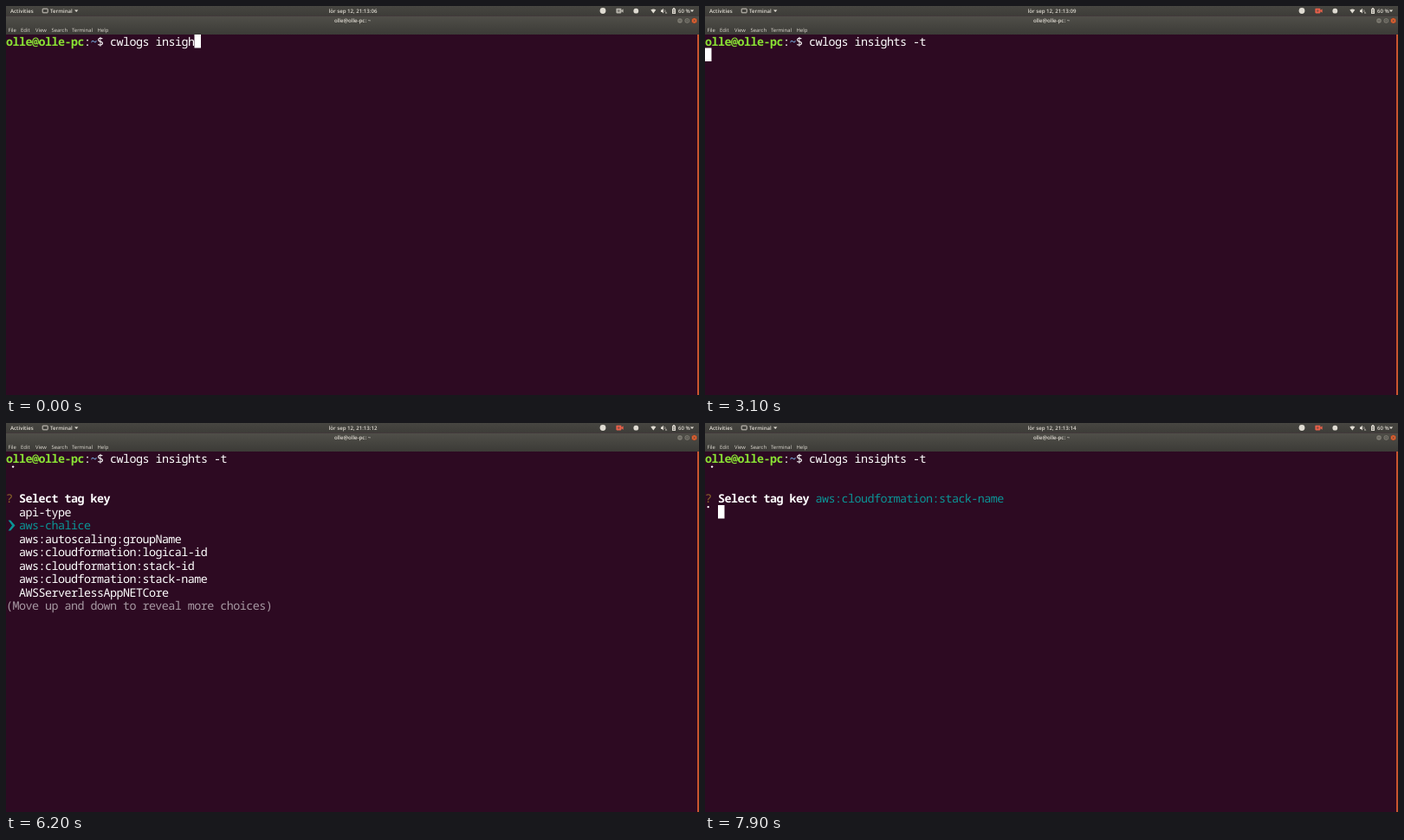
Animation of 800 by 450 pixels, one loop 8000 ms. Source, as an HTML page:

```html
<!DOCTYPE html>
<html lang="en">
<head>
<meta charset="utf-8">
<title>Terminal</title>
<style>
  html, body { margin: 0; width: 100%; height: 100%; overflow: hidden; background: #2d0a22; }
  svg { display: block; width: 800px; height: 450px; }
  text { white-space: pre; text-rendering: geometricPrecision; }
  .ui { font: 600 6.1px "Open Sans", "Noto Sans", sans-serif; fill: #dfdbd2; }
  .menu { font-weight: 400; font-size: 5.9px; }
  .term { font: 13.4px "Noto Sans Mono", "DejaVu Sans Mono", monospace; letter-spacing: -.54px; fill: #fff; }
  .b { font-weight: 700; }
  .user { fill: #8ae234; }
  .path { fill: #729fcf; }
  .ask { fill: #8f6a2b; }
  .pick { fill: #0b9496; }
  .dim { fill: #a799a3; }
</style>
</head>
<body>
<svg viewBox="0 0 800 450">
  <defs>
    <linearGradient id="panel" x2="0" y2="1">
      <stop stop-color="#474641"/><stop offset="1" stop-color="#3d3c38"/>
    </linearGradient>
    <linearGradient id="bar" x2="0" y2="1">
      <stop stop-color="#504f49"/><stop offset="1" stop-color="#3c3b37"/>
    </linearGradient>
  </defs>
  <rect width="800" height="450" fill="#2d0a22"/>
  <rect width="800" height="11.5" fill="url(#panel)"/>
  <rect y="11.5" width="800" height="21.5" fill="url(#bar)"/>
  <rect x="798" y="33" width="2" height="417" fill="#c9552f"/>

  <g class="ui">
    <text x="5" y="8">Activities</text>
    <text x="51" y="8">Terminal</text>
    <text x="400.5" y="8" text-anchor="middle" id="clock"></text>
    <text x="400" y="19.2" text-anchor="middle">olle@olle-pc: ~</text>
    <text x="776" y="8">60 %</text>
  </g>
  <g class="ui menu">
    <text x="2.5" y="30.2">File</text>
    <text x="17" y="30.2">Edit</text>
    <text x="34" y="30.2">View</text>
    <text x="52.5" y="30.2">Search</text>
    <text x="76" y="30.2">Terminal</text>
    <text x="105.5" y="30.2">Help</text>
  </g>

  <g fill="#dfdbd2">
    <path d="M79 4.5h4.4l-2.2 2.6zM789.8 4.5h4.4l-2.2 2.6z"/>
    <rect x="42.2" y="3.2" width="6" height="4.6" rx=".6" fill="none" stroke="#dfdbd2" stroke-width=".9"/>
    <circle cx="689" cy="5.5" r="3.4"/>
    <circle cx="727.3" cy="5.7" r="2.9"/>
    <path d="M747.3 8.6l-3-4q3-2 6 0z"/>
    <path d="M756 4.4h1.3L759 2.8v5.8l-1.7-1.6H756z"/>
    <path d="M760.4 4.3q1.2 1.4 0 2.8M761.2 7l1.6 1.6m0-1.6l-1.6 1.6" fill="none" stroke="#dfdbd2" stroke-width=".6"/>
    <path d="M769 3.2h1v-.9h2v.9h1V9h-4z"/>
    <path d="M770 4.6h2m-2 1.5h2m-2 1.5h2" stroke="#45443f" stroke-width=".6"/>
  </g>
  <g id="camera">
    <rect x="704.4" y="2.8" width="6" height="5.6" rx=".8"/>
    <path d="M710 5.2l2.6-1.8v4.4L710 6z"/>
    <circle cx="707.3" cy="5.6" r="1.3" fill="#45443f" opacity=".55"/>
  </g>
  <g stroke="#32312d" stroke-width=".5" fill="#7d7b72">
    <circle cx="778" cy="17" r="3.3"/><circle cx="786.3" cy="17" r="3.3"/>
    <circle cx="794.6" cy="17" r="3.3" fill="#e4602f"/>
  </g>
  <g stroke="#45443f" stroke-width=".7" fill="none">
    <path d="M776.6 17h2.8M785.1 15.8h2.4v2.4h-2.4zM793.4 15.8l2.4 2.4m0-2.4l-2.4 2.4"/>
  </g>

  <g class="term" id="screen"></g>
</svg>
<script>
const LOOP = 8000, COL = 7.5, ROW = 15.5, TOP = 33;
const $ = id => document.getElementById(id);

const typed = [[0, "insigh"], [100, "insight"], [500, "insights "], [900, "insights -"], [1400, "insights -t"]];
const cursor = [
  [0, [29, 0]], [100, [30, 0]], [500, [32, 0]], [900, [33, 0]], [1400, [34, 0]],
  [2000, null], [2600, [34, 0]], [3100, [0, 1]], [3400, [2, 1]],
  [3700, null], [4300, [2, 1]], [4900, null], [7900, [2, 4]]
];
const chosen = [[5100, 0], [6200, 1], [6500, 2], [6700, 3], [6900, 4], [7200, 5]];
const keys = ["api-type", "aws-chalice", "aws:autoscaling:groupName", "aws:cloudformation:logical-id",
  "aws:cloudformation:stack-id", "aws:cloudformation:stack-name", "AWSServerlessAppNETCore",
  "BackfillFor", "Component"];
const spin = "02466125513460257";   // one dot position per 100 ms
const DONE = 7900;

const at = (list, t) => list.filter(e => e[0] <= t).pop()[1];

const put = (col, row, str, cls = "") =>
  `<text x="${col * COL}" y="${TOP + row * ROW + 12.6}" class="${cls}">${str}</text>`;

// Dot 0-7 runs down the left side of a braille cell and up the right.
function dot(i, row) {
  const x = i < 4 ? 3.7 : 8.1, y = i < 4 ? i : 7 - i;
  return `<circle cx="${x}" cy="${TOP + row * ROW + 2.1 + y * 4.3}" r="1.2"/>`;
}

function pointer(row) {
  const y = TOP + row * ROW + 2;
  return `<path class="pick" d="M2.6 ${y}h2.7l5.2 6-5.2 6H2.6l4.4-6z"/>`;
}

function menu(t) {
  const sel = at(chosen, t), first = Math.max(0, sel - 3);
  let out = t < 6200 ? put(17, 3, "(Use arrow keys)", "dim") : "";
  keys.slice(first, first + 7).forEach((key, i) => {
    const on = first + i === sel;
    out += (on ? pointer(4 + i) : "") + put(2, 4 + i, key, on ? "pick" : "");
  });
  return out + put(0, 11, "(Move up and down to reveal more choices)", "dim");
}

function screen(t) {
  let out = put(0, 0, "olle@olle-pc", "b user") + put(12, 0, ":") + put(13, 0, "~", "b path") +
    put(14, 0, "$ cwlogs " + at(typed, t));
  if (t >= 3400) out += dot(+spin[Math.min(spin.length - 1, Math.floor((t - 3400) / 100))], 1);
  if (t >= 5100) {
    out += put(0, 3, "?", "ask") + put(2, 3, "Select tag key", "b");
    out += t < DONE ? menu(t) : put(17, 3, keys[5], "pick") + dot(0, 4);
  }
  const c = at(cursor, t);
  if (c) out += `<rect x="${c[0] * COL}" y="${TOP + c[1] * ROW}" width="${COL}" height="${ROW}"/>`;
  return out;
}

let shown = -1;
function draw(now) {
  const t = Math.floor(now % LOOP / 100) * 100;
  if (t !== shown) {
    shown = t;
    const sec = 6 + Math.floor((t + 500) / 1000);
    $("clock").textContent = "lör sep 12, 21:13:" + String(sec).padStart(2, "0");
    $("camera").setAttribute("fill", t < 200 ? "#b5b2aa" : "#e8604a");
    $("screen").innerHTML = screen(t);
  }
  requestAnimationFrame(draw);
}
draw(performance.now());
</script>
</body>
</html>
```
